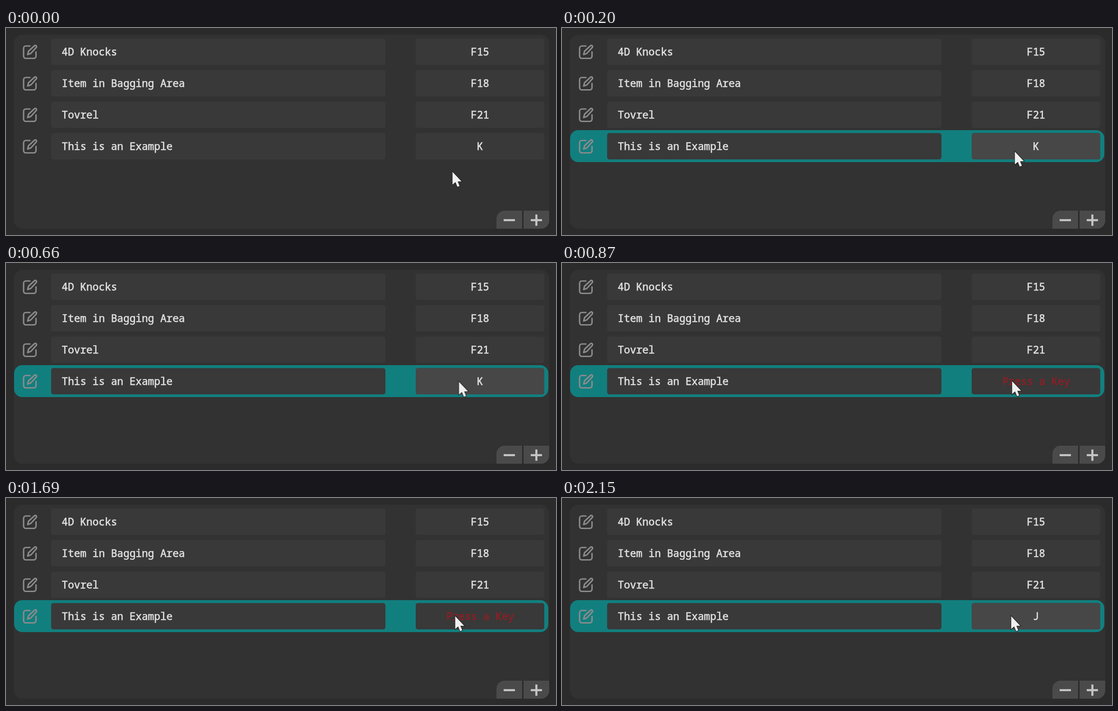
These frames come from a looping animation (1219 px wide and 460 px high, 3.46 s). An HTML page:

```html
<!DOCTYPE html>
<html lang="en">
<head>
<meta charset="utf-8">
<title>Key bindings</title>
<style>
  html, body { margin: 0; width: 100%; height: 100%; overflow: hidden; background: #2b2b2b; }
  svg { display: block; width: 100%; height: 100%; }
  text {
    font: 500 22.75px "Noto Sans Mono", "DejaVu Sans Mono", monospace;
    fill: #dedede; stroke: #dedede; stroke-width: .75px;
  }
  .key { text-anchor: middle; }
  .prompt { fill: #8c2026; stroke: #8c2026; }
  .field { fill: #393939; }
  .hot { fill: #474747; }
  .icon { fill: none; stroke: #8b8b8b; stroke-width: 3.2; stroke-linecap: round; stroke-linejoin: round; }
  .sign { stroke: #c6c6c6; stroke-width: 4.6; }

  .selected, .hover, .before, .waiting, .after { animation: 3460ms step-end infinite; }
  .selected { animation-name: selected; }
  .hover { animation-name: hover; }
  .before { animation-name: before; }
  .waiting { animation-name: waiting; }
  .after { animation-name: after; }
  .cursor { animation: move 3460ms linear infinite; }

  @keyframes selected { 0% { opacity: 0 } 5.78%, 100% { opacity: 1 } }
  @keyframes hover {
    0% { opacity: 0 } 5.78% { opacity: 1 } 20.231% { opacity: 0 } 51.734%, 100% { opacity: 1 }
  }
  @keyframes before { 0% { opacity: 1 } 20.231%, 100% { opacity: 0 } }
  @keyframes waiting { 0% { opacity: 0 } 20.231% { opacity: 1 } 51.734%, 100% { opacity: 0 } }
  @keyframes after { 0% { opacity: 0 } 51.734%, 100% { opacity: 1 } }
  @keyframes move {
    0% { transform: translate(989px, 318px); animation-timing-function: step-end }
    2.023% { transform: translate(993px, 305px); animation-timing-function: step-end }
    5.78% { transform: translate(1003px, 273px); animation-timing-function: ease-out }
    14.74% { transform: translate(1007px, 263px); animation-timing-function: ease-in-out }
    25.145% { transform: translate(997px, 261px); animation-timing-function: ease-out }
    31.214%, 100% { transform: translate(995px, 261px) }
  }
</style>
</head>
<body>
<svg viewBox="0 0 1219 460" preserveAspectRatio="none">
  <defs>
    <g id="row">
      <g class="icon">
        <path d="M53 40H44a5 5 0 0 0-5 5V62.500a5 5 0 0 0 5 5H61.500a5 5 0 0 0 5-5V53"/>
        <path d="M48 59l2-7.500L63 39.500a2.600 2.600 0 0 1 4 3.800L55 56.500Z"/>
      </g>
      <rect class="field" x="100" y="23.500" width="741" height="58.500" rx="5"/>
      <rect class="field" x="908" y="23.500" width="285" height="58.500" rx="5"/>
    </g>
  </defs>

  <rect x="17" y="15" width="1187" height="431" rx="20" fill="#323232"/>
  <rect class="selected" x="18" y="227" width="1184" height="71" rx="18" fill="#127f7f"/>

  <g>
    <use href="#row"/>
    <text x="123.500" y="61">4D Knocks</text>
    <text class="key" x="1050.500" y="61">F15</text>
  </g>
  <g transform="translate(0 70)">
    <use href="#row"/>
    <text x="123.500" y="61">Item in Bagging Area</text>
    <text class="key" x="1050.500" y="61">F18</text>
  </g>
  <g transform="translate(0 140)">
    <use href="#row"/>
    <text x="123.500" y="61">Tovrel</text>
    <text class="key" x="1050.500" y="61">F21</text>
  </g>
  <g transform="translate(0 210)">
    <use href="#row"/>
    <text x="123.500" y="61">This is an Example</text>
    <rect class="hot hover" x="908" y="23.500" width="285" height="58.500" rx="5"/>
    <text class="key before" x="1050.500" y="61">K</text>
    <text class="key prompt waiting" x="1051" y="61">Press a Key</text>
    <text class="key after" x="1050.500" y="61">J</text>
  </g>

  <path fill="#292929" d="M1143 406h5v40h-5z"/>
  <path fill="#4a4a4a" d="M1144 406V446H1087V424a18 18 0 0 1 18-18ZM1147 406H1204V428a18 18 0 0 1-18 18H1147Z"/>
  <path class="sign" d="M1103 427h25M1163 427h25M1175.500 414.500v25"/>

  <path class="cursor" fill="#efefef" stroke="#202020" stroke-width="1.200" stroke-linejoin="round"
        d="M0 0V31.500L7 25.500L11 35.500L17 33.500L13 23.500H22Z"/>
</svg>
</body>
</html>
```
